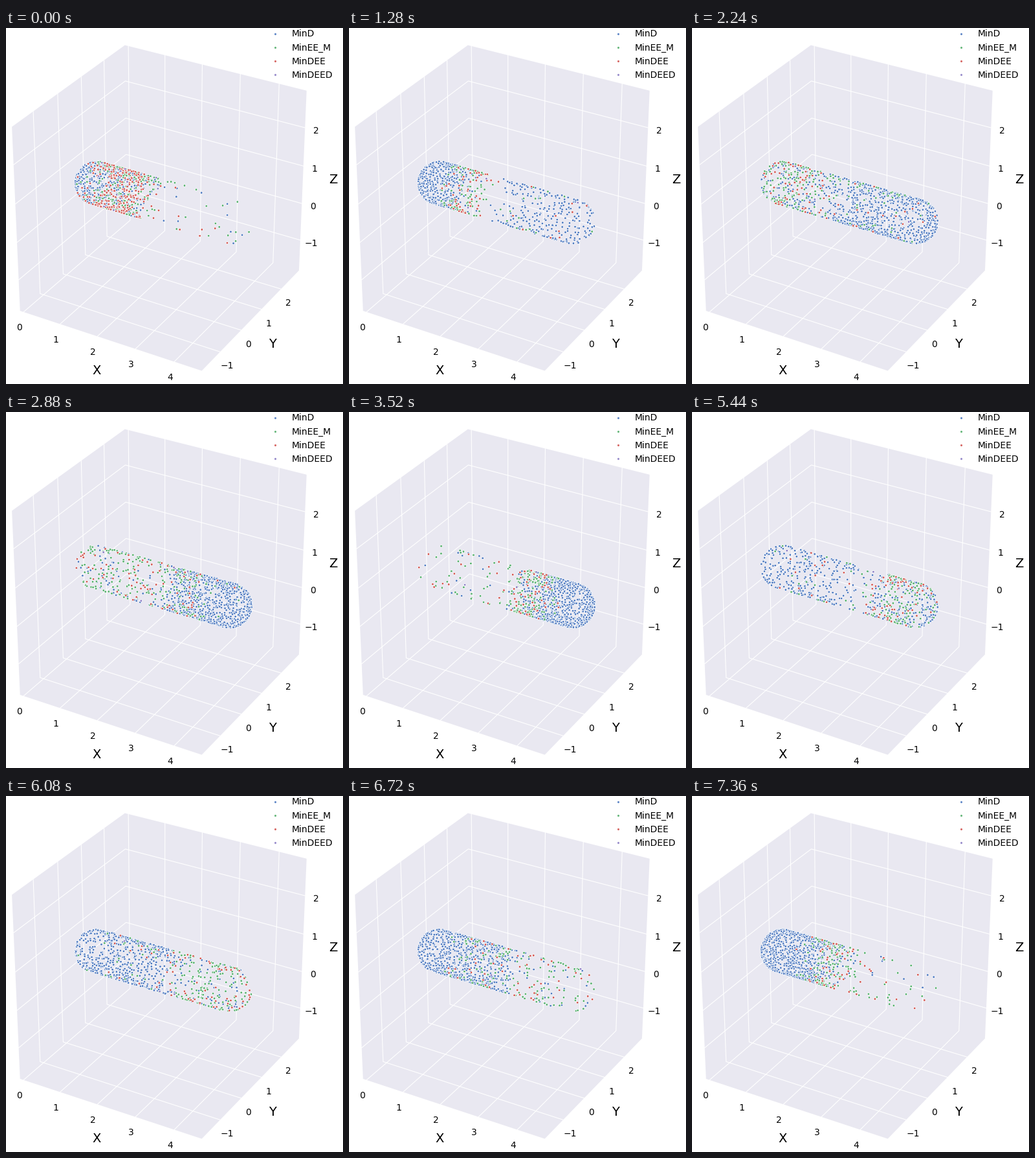
Write a matplotlib script that moves like this. It is 521 px wide and 550 px high and loops after 7520 ms.

```python
import numpy as np
import matplotlib.pyplot as plt
from matplotlib.animation import FuncAnimation

W, H = 521, 550
FRAMES, STEP = 47, 160
PT = 0.72  # points per pixel at 100 dpi

COLORS = {"MinD": "#4C78C0", "MinEE_M": "#52AE6A",
          "MinDEE": "#D2544F", "MinDEED": "#8A7BC4"}
PANE = "#E9E8F1"

# Scene: a cube seen from elev 30, azim -60, at distance 10
MID = np.array([2.3, 0.55, 0.55])
HALF = 4.6 / 2 * 25 / 24
UNIT = 1.1003 / (2 * HALF)
SCALE, CENTER = 294.7, (241.0, 268.6)
LO, HI = MID - HALF, MID + HALF

# Cell: a capsule along x
LENGTH, RADIUS, MARGIN = 4.5, 0.5, 0.05
SITES = 3400


def project(x, y, z):
    e, a = np.radians(30), np.radians(-60)
    p = [(c - m) * UNIT for c, m in zip((x, y, z), MID)]
    across = -np.sin(a) * p[0] + np.cos(a) * p[1]
    radial = np.cos(a) * p[0] + np.sin(a) * p[1]
    up = np.cos(e) * p[2] - np.sin(e) * radial
    near = np.cos(e) * radial + np.sin(e) * p[2]
    k = SCALE * 10 / (10 - near)
    return CENTER[0] + across * k, CENTER[1] - up * k


def capsule_sites(rng):
    i = np.arange(SITES)
    s = LENGTH * (i + 0.5) / SITES
    s = np.clip(s + rng.normal(0, 0.02, SITES), 0, LENGTH)
    turn = i * np.pi * (3 - np.sqrt(5)) + rng.normal(0, 0.05, SITES)
    cap = np.maximum(0, RADIUS - np.minimum(s, LENGTH - s))
    r = np.sqrt(RADIUS ** 2 - cap ** 2)
    xy = project(s + MARGIN, MID[1] + r * np.cos(turn), MID[2] + r * np.sin(turn))
    return s, np.column_stack(xy)


# Life of one polar cap: phase, MinD count and reach,
# MinEE_M count, MinDEE count, ring centre and width
LIFE = np.array([
    [0, 130, 2.2, 14, 12, 1.5, 0.8],
    [4, 260, 2.2, 16, 12, 1.5, 0.8],
    [10, 680, 2.4, 40, 18, 1.6, 0.8],
    [16, 780, 1.8, 110, 40, 1.9, 0.3],
    [18, 740, 1.5, 120, 50, 1.55, 0.25],
    [26, 400, 1.0, 70, 45, 1.2, 0.25],
    [33, 80, 1.8, 160, 60, 0.7, 0.6],
    [40, 7, 2.0, 30, 12, 1.3, 0.8],
    [44, 12, 2.2, 18, 8, 1.4, 0.8],
    [47, 130, 2.2, 14, 12, 1.5, 0.8],
])


def cap_state(phase):
    return [np.interp(phase % FRAMES, LIFE[:, 0], col) for col in LIFE[:, 1:].T]


def populate(frame):
    """Species index of each site, -1 where the site is empty."""
    rng = np.random.default_rng(100 + frame)
    kind = np.full(SITES, -1)
    early = np.exp(-frame / 2)
    for dist, start, burst in ((site_s, 29.5, early),
                               (LENGTH - site_s, 4, 0)):
        n_d, reach, n_ee, n_dee, mid, width = cap_state(frame - start)
        n_d -= 260 * burst
        n_ee += 60 * burst
        n_dee += 180 * burst
        mid -= 0.55 * burst
        width += 0.15 * burst
        ring = np.exp(-((dist - mid) / width) ** 2 / 2)
        body = 1 / (1 + np.exp((dist - reach) / 0.12))
        for k, n, weight in ((1, n_ee, ring), (2, n_dee, ring),
                             (3, n_dee / 20, ring), (0, n_d, body)):
            p = (weight + 1e-5) * (kind < 0)
            kind[rng.choice(SITES, int(round(n)), replace=False, p=p / p.sum())] = k
    return kind


fig = plt.figure(figsize=(W / 100, H / 100), dpi=100, facecolor="white")
ax = fig.add_axes([0, 0, 1, 1])
ax.set(xlim=(0, W), ylim=(H, 0))
ax.axis("off")


def label(x, y, text, points, ha="center"):
    """Text with its capitals centred on y."""
    ax.text(x, y + 0.365 * points / PT, text, fontsize=points, ha=ha,
            va="baseline", family="DejaVu Sans", color="black")


def grid(*points):
    ax.plot(*project(*np.array(points).T), color="white", lw=1.1 * PT, zorder=1)


def dots(x, y, color):
    return ax.scatter(x, y, s=(3.6 * PT) ** 2, facecolor=color,
                      edgecolor="white", linewidth=0.75 * PT, zorder=3)


(x0, y0, z0), (x1, y1, z1) = LO, HI
outline = [(x0, y0, z0), (x1, y0, z0), (x1, y1, z0),
           (x1, y1, z1), (x0, y1, z1), (x0, y0, z1)]
ax.fill(*project(*np.array(outline).T), color=PANE, lw=0, zorder=0)


def tick(value, at, dx, dy):
    x, y = project(*at)
    label(x + dx, y + dy, str(value).replace("-", "\u2212"), 10)


for v in range(5):
    grid((v, y0, z0), (v, y1, z0), (v, y1, z1))
    tick(v, (v, y0, z0), -6.8, 23.5)
for v in range(-1, 3):
    grid((x1, v, z0), (x0, v, z0), (x0, v, z1))
    grid((x0, y0, v), (x0, y1, v), (x1, y1, v))
    tick(v, (x1, v, z0), 11, 21)
    tick(v, (x1, y1, v), 17.2, 4)

label(140.5, 528, "X", 14)
label(411.5, 487, "Y", 14)
label(506, 232.5, "Z", 14)

for row, (name, color) in enumerate(COLORS.items()):
    y = 8 + 21.3 * row
    dots([416], [y + 0.5], color)
    label(442, y, name, 10, ha="left")

site_s, site_xy = capsule_sites(np.random.default_rng(7))
palette = np.array(list(COLORS.values()))
cloud = dots([], [], PANE)


def update(frame):
    kind = populate(frame)
    order = np.argsort(kind, kind="stable")
    order = order[kind[order] >= 0]
    cloud.set_offsets(site_xy[order])
    cloud.set_facecolor(list(palette[kind[order]]))
    return cloud,


anim = FuncAnimation(fig, update, frames=FRAMES, interval=STEP, repeat=True)
plt.show()
```
